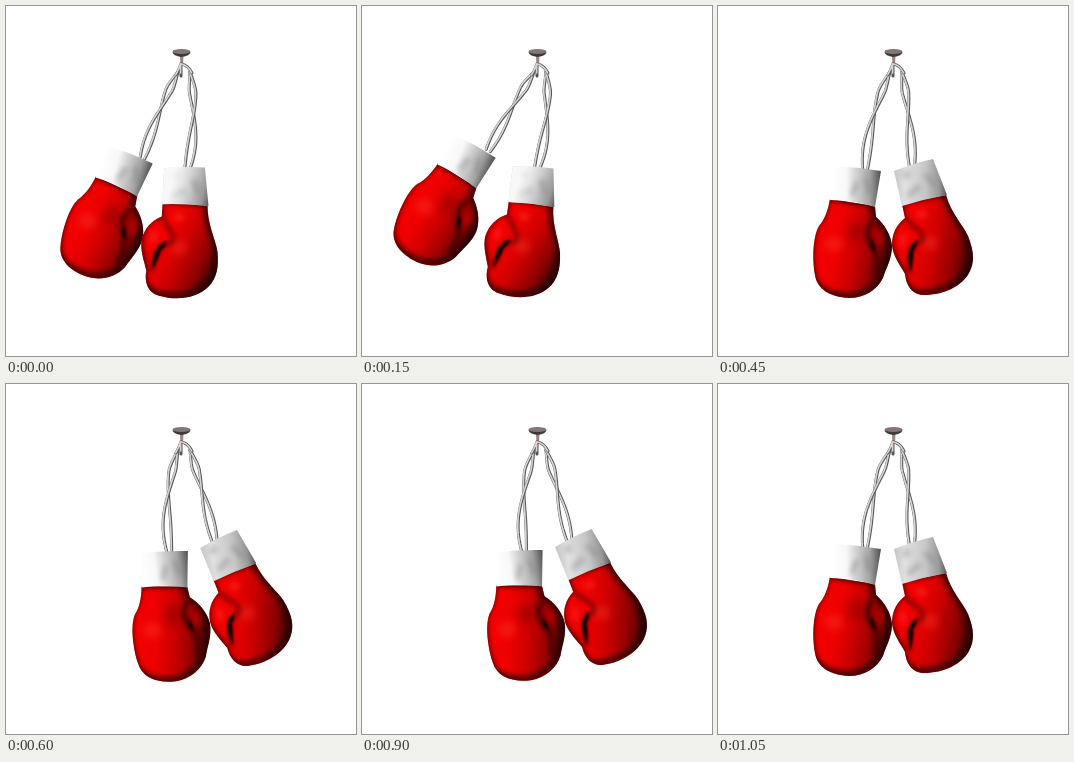
These frames come from a looping animation (350x350 px, 1200 ms). An HTML page:

```html
<!DOCTYPE html>
<html lang="en">
<head>
<meta charset="utf-8">
<title>Swinging boxing gloves</title>
<style>
  html, body { margin: 0; width: 100%; height: 100%; overflow: hidden; background: #fff; }
  svg { display: block; width: 100vw; height: 100vh; }
  .cord path { fill: none; stroke-linecap: round; }
  .rim { stroke: #555; stroke-width: 3; }
  .core { stroke: #d4d4d4; stroke-width: 1.7; transform: translate(-.4px, -.2px); }
  .edge { fill: none; stroke: #200; stroke-width: 6; filter: url(#soft3); opacity: .85; transform: translate(-2.5px, -2px); }
</style>
</head>
<body>
<svg viewBox="0 0 350 350">
  <defs>
    <filter id="soft1" x="-50%" y="-50%" width="200%" height="200%"><feGaussianBlur stdDeviation="1"/></filter>
    <filter id="soft3" x="-50%" y="-50%" width="200%" height="200%"><feGaussianBlur stdDeviation="2.6"/></filter>
    <filter id="soft5" x="-80%" y="-80%" width="260%" height="260%"><feGaussianBlur stdDeviation="5"/></filter>
    <linearGradient id="red" x1="0" y1=".3" x2="1" y2=".55">
      <stop offset="0" stop-color="#f60000"/><stop offset=".32" stop-color="#ee0000"/>
      <stop offset=".55" stop-color="#cc0000"/><stop offset=".8" stop-color="#920000"/>
      <stop offset="1" stop-color="#400000"/>
    </linearGradient>
    <linearGradient id="clothLeft">
      <stop offset="0" stop-color="#fff"/><stop offset=".32" stop-color="#f8f8f8"/>
      <stop offset=".5" stop-color="#d4d4d4"/><stop offset=".78" stop-color="#a4a4a4"/>
      <stop offset="1" stop-color="#505050"/>
    </linearGradient>
    <linearGradient id="clothRight">
      <stop offset="0" stop-color="#bebebe"/><stop offset=".2" stop-color="#dedede"/>
      <stop offset=".6" stop-color="#c6c6c6"/><stop offset=".85" stop-color="#989898"/>
      <stop offset="1" stop-color="#585858"/>
    </linearGradient>
    <linearGradient id="glare">
      <stop offset="0" stop-color="#fff"/><stop offset=".2" stop-color="#fff" stop-opacity=".9"/>
      <stop offset=".6" stop-color="#fff" stop-opacity="0"/>
    </linearGradient>
    <path id="bodyLeft" d="M112 193C110 204 107 213 101 220C95 230 94 253 97 269C99 283 112 291 131 292C147 292 159 284 165 272C168 262 174 253 174 240C173 229 167 219 158 211L157 200Z"/>
    <path id="bodyRight" d="M184 198L187 212C178 219 174 228 174 239C175 250 182 259 187 268C188 279 194 289 206 289C226 289 244 280 251 267C257 256 256 245 250 230C245 219 233 207 228 189Z"/>
    <path id="cuffLeft" d="M116 160Q140 161 163 165L157 201Q135 194 112 194Z"/>
    <path id="cuffRight" d="M176 165Q196 157 215 153L229 189Q206 193 184 200Z"/>
    <clipPath id="clipBodyLeft"><use href="#bodyLeft"/></clipPath>
    <clipPath id="clipBodyRight"><use href="#bodyRight"/></clipPath>
    <clipPath id="clipCuffLeft"><use href="#cuffLeft"/></clipPath>
    <clipPath id="clipCuffRight"><use href="#cuffRight"/></clipPath>
  </defs>

  <g id="nail">
    <path d="M174 49h3.5l-.5 11h-2.5Z" fill="#a08080"/>
    <path d="M166.500 46Q167 50 175.500 51Q184 50 184.500 46Z" fill="#403838"/>
    <ellipse cx="175.500" cy="45.600" rx="9" ry="2.500" fill="#817777"/>
  </g>
  <g id="cords"></g>
  <g class="cord">
    <path class="rim" d="M170 69Q172 66 175 58Q182 59 186 67M175 70V58"/>
    <path class="core" d="M170 69Q172 66 175 58Q182 59 186 67M175 67V58"/>
  </g>

  <g id="gloveLeft">
    <use href="#bodyLeft" fill="url(#red)"/>
    <g clip-path="url(#clipBodyLeft)">
      <use href="#bodyLeft" class="edge"/>
      <path d="M156 214C148 222 148 230 153 238C159 247 161 257 156 270" fill="none" stroke="#400" stroke-width="5" filter="url(#soft3)"/>
      <path d="M152 233Q157 236 157 245Q152 243 152 233Z" fill="#100" filter="url(#soft1)"/>
      <ellipse cx="116" cy="238" rx="9" ry="7" fill="#ff4030" opacity=".45" filter="url(#soft5)"/>
      <ellipse cx="138" cy="226" rx="8" ry="10" fill="#700" opacity=".45" filter="url(#soft5)"/>
      <ellipse cx="162" cy="232" rx="3" ry="8" fill="#c00" opacity=".7" filter="url(#soft3)"/>
    </g>
    <use href="#cuffLeft" fill="url(#clothLeft)"/>
    <g clip-path="url(#clipCuffLeft)">
      <path d="M134 190L139 176M148 172L152 188" stroke="#777" stroke-width="5" opacity=".4" filter="url(#soft3)"/>
    </g>
  </g>

  <g id="gloveRight">
    <use href="#bodyRight" fill="url(#red)"/>
    <g clip-path="url(#clipBodyRight)">
      <use href="#bodyRight" class="edge"/>
      <path d="M187 212C196 222 207 226 205 235C196 236 190 247 192 268" fill="none" stroke="#700" stroke-width="4" filter="url(#soft3)"/>
      <path d="M199 234Q191 239 190 250L192 266Q196 255 195 245Q199 240 199 234Z" fill="#100" filter="url(#soft1)"/>
      <ellipse cx="212" cy="237" rx="7" ry="6" fill="#ff3c30" opacity=".55" filter="url(#soft5)"/>
      <ellipse cx="204" cy="208" rx="6" ry="4" fill="#ff3c30" opacity=".4" filter="url(#soft3)"/>
      <ellipse cx="185" cy="234" rx="3" ry="7" fill="#f33" opacity=".5" filter="url(#soft3)"/>
    </g>
    <use href="#cuffRight" fill="url(#clothRight)"/>
    <g clip-path="url(#clipCuffRight)">
      <path d="M190 190L202 180M207 168L217 180M185 170L192 168" stroke="#888" stroke-width="6" opacity=".45" filter="url(#soft3)"/>
    </g>
    <use href="#cuffRight" class="glare" fill="url(#glare)"/>
  </g>
</svg>
<script>
const STEP = 150;

// Each glove pose: wrist x, wrist y, turn in degrees, cord bow; the right cuff adds glare.
const outLeft = { left: [110.5, 180.5, 16, -2], right: [179, 198.5, 16, 5, .9] };
const farLeft = { left: [95, 170, 23, -1], right: [169, 198, 20, 5, .9] };
const middle = { left: [134.5, 197, 0, -5], right: [206, 194, 0, 2, .1] };
const outRight = { left: [158.5, 203, -8.6, -6], right: [228.5, 188, -9, 1, .1] };
const farRight = { left: [171, 203, -13.5, -6], right: [241.5, 182, -15, 0, .1] };

const nudge = (pose, dx, dy) => Object.fromEntries(
  Object.entries(pose).map(([side, [x, y, ...rest]]) => [side, [x + dx, y + dy, ...rest]]));

const swing = [outLeft, farLeft, nudge(outLeft, 1, .5), middle,
  outRight, farRight, nudge(outRight, -1.3, -1), middle];

const makeGlove = (id, wrist, tie, hook) => {
  const group = document.getElementById(id);
  const cord = document.createElementNS("http://www.w3.org/2000/svg", "g");
  cord.setAttribute("class", "cord");
  cord.innerHTML = '<path class="rim"/><path class="core"/>'.repeat(2);
  document.getElementById("cords").append(cord);
  return { group, wrist, tie, hook, strands: [...cord.children], glare: group.querySelector(".glare") };
};

const gloves = {
  left: makeGlove("gloveLeft", [134.5, 197], [147, 164], [172, 66]),
  right: makeGlove("gloveRight", [206, 194], [194, 162], [184, 66])
};

// One of two strands winding around a bowed line.
function strandPath([x0, y0], [x1, y1], bow, side) {
  const length = Math.hypot(x1 - x0, y1 - y0);
  const nx = (y1 - y0) / length, ny = (x0 - x1) / length;
  const points = [];
  for (let i = 0; i <= 28; i++) {
    const t = i / 28;
    const twist = 4 * Math.min(1, 5 * t) * Math.sin(1.4 * Math.PI * (t - .43));
    const off = 4 * bow * t * (1 - t) + side * twist;
    points.push(`${(x0 + (x1 - x0) * t + nx * off).toFixed(2)} ${(y0 + (y1 - y0) * t + ny * off).toFixed(2)}`);
  }
  return "M" + points.join("L");
}

function place(glove, [x, y, turn, bow, glare]) {
  const { group, wrist, tie, hook, strands } = glove;
  group.setAttribute("transform", `translate(${x} ${y}) rotate(${turn}) translate(${-wrist[0]} ${-wrist[1]})`);
  glove.glare?.setAttribute("opacity", glare);
  const a = turn * Math.PI / 180, dx = tie[0] - wrist[0], dy = tie[1] - wrist[1];
  const end = [
    x + dx * Math.cos(a) - dy * Math.sin(a) + turn * .3,
    y + dx * Math.sin(a) + dy * Math.cos(a)
  ];
  strands.forEach((path, i) => path.setAttribute("d", strandPath(hook, end, bow, i < 2 ? 1 : -1)));
}

let shown = -1;
function draw() {
  const step = Math.floor(performance.now() / STEP) % swing.length;
  if (step !== shown) {
    shown = step;
    for (const side in gloves) place(gloves[side], swing[step][side]);
  }
  requestAnimationFrame(draw);
}
draw();
</script>
</body>
</html>
```
